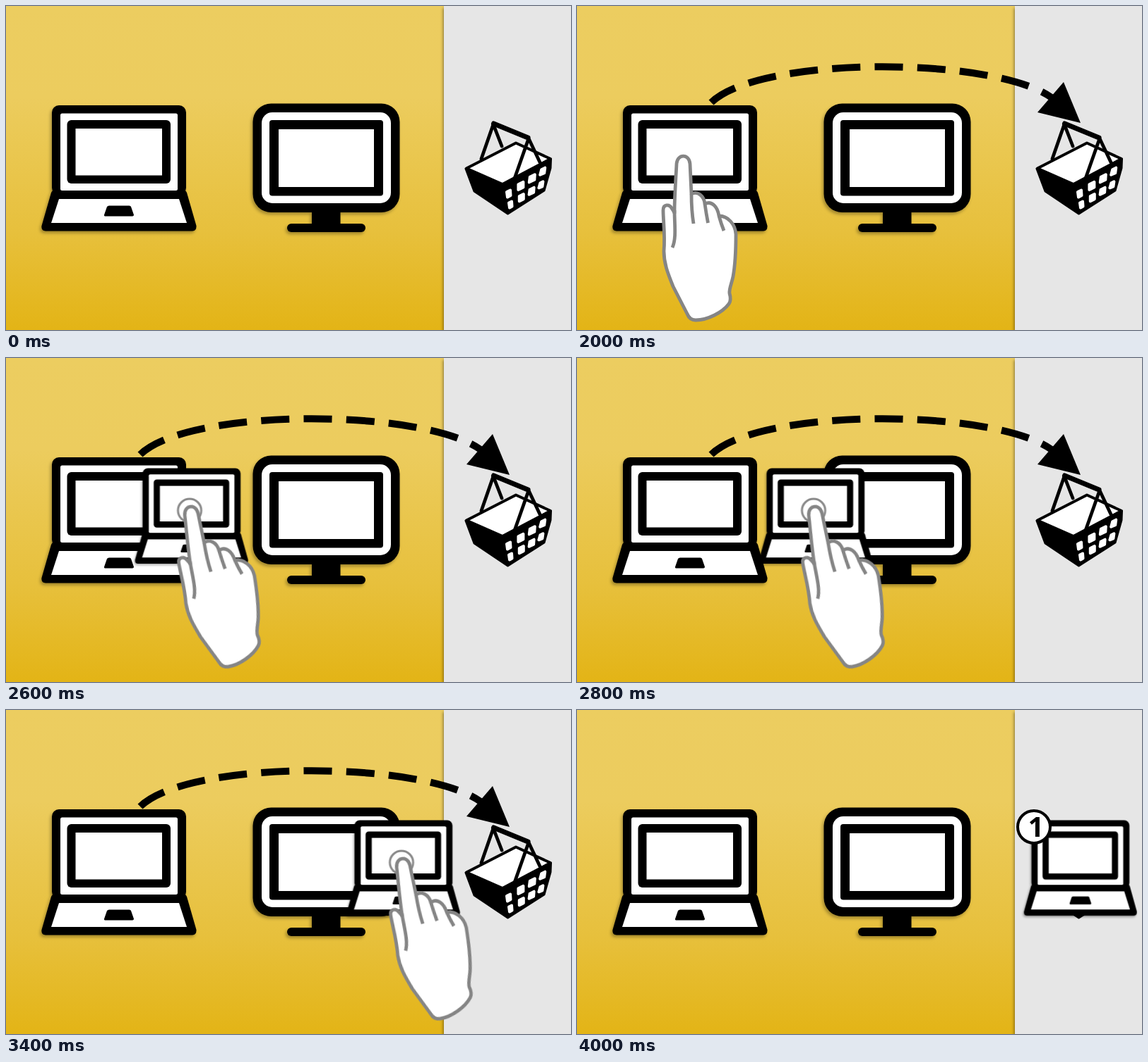
These frames come from a looping animation (800 px wide and 460 px high, 6000 ms). An HTML page:

```html
<!DOCTYPE html>
<html lang="en">
<head>
<meta charset="utf-8">
<title>Drag to basket</title>
<style>
html, body { margin: 0; width: 100%; height: 100%; overflow: hidden; }
body { position: relative; background: linear-gradient(#eccd60 0, #eccc5e 28%, #e7c03c 70%, #e3b416 100%); }
.panel { position: absolute; left: 620px; top: 0; right: 0; bottom: 0; background: #e6e6e6; box-shadow: -1px 3px 4px rgba(0, 0, 0, .45); }
svg { position: absolute; left: 0; top: 0; display: block; }
.device { filter: drop-shadow(-2px 3px 2px rgba(0, 0, 0, .3)); }
.w { fill: #fff; }
.line { fill: none; stroke: #000; stroke-linecap: round; stroke-linejoin: round; }
.skin { fill: #fff; stroke: #858585; stroke-width: 4.8; stroke-linejoin: round; stroke-linecap: round; }
.skin .crease { fill: none; stroke-linecap: butt; }
.ring { fill: #fff; stroke: #8a8a8a; stroke-width: 3; }
.badge text { font: 700 39px "Open Sans", "Noto Sans", sans-serif; text-anchor: middle; }

/* Percentages sit a hair early so each step is in place on its tick. */
.arrow, .copy, .hand, .ring, .badge, .pose, .drag { animation: 6s step-end infinite; }
.arrow { animation-name: arrow; }
.copy { animation-name: copy; }
.hand { animation-name: hand; }
.ring { animation-name: ring; }
.badge { animation-name: badge; }
.pose { animation-name: pose; transform-origin: 150px 213px; }
.drag { animation-name: drag; }
@keyframes arrow { 0% { visibility: hidden } 16.66% { visibility: visible } 66.66%, 100% { visibility: hidden } }
@keyframes hand { 0% { visibility: hidden } 33.33% { visibility: visible } 66.66%, 100% { visibility: hidden } }
@keyframes ring { 0% { visibility: hidden } 36.66% { visibility: visible } 64.99%, 100% { visibility: hidden } }
@keyframes copy { 0% { visibility: hidden } 38.33%, 100% { visibility: visible } }
@keyframes badge { 0% { visibility: hidden } 66.66%, 100% { visibility: visible } }
@keyframes pose {
  0% { transform: none }
  34.99% { transform: translate(-1px, -1px) rotate(-4.5deg) }
  36.66%, 100% { transform: translate(-2.2px, -2px) rotate(-9deg) }
}
@keyframes drag {
  0% { transform: translateX(0) }
  38.33% { transform: translateX(0); animation-timing-function: steps(15, end) }
  63.33%, 100% { transform: translateX(562.5px) }
}
</style>
</head>
<body>
<div class="panel"></div>
<svg width="800" height="460" viewBox="0 0 800 460">
  <defs>
    <g id="laptop">
      <rect x="65" y="141" width="190" height="127" rx="10"/>
      <path d="M67 262H253Q255 262 256 265L269.500 312Q270 319.500 264 319.500H56Q49.500 319.500 50.500 312L64 265Q65 262 67 262Z"/>
      <rect class="w" x="77" y="152.500" width="166" height="109.500" rx="2.500"/>
      <rect x="86.500" y="162" width="146.500" height="90" rx="6"/>
      <rect class="w" x="98.500" y="174" width="122.500" height="66.500"/>
      <path class="w" d="M75 274H245L256 308H64Z"/>
      <path d="M146 283.500H174.500Q176.500 283.500 177 285L181 296.500Q181 298.500 179 298.500H141Q138.500 298.500 139 296.500L143 285Q144 283.500 146 283.500Z"/>
    </g>
  </defs>

  <use class="device" href="#laptop"/>

  <g class="device">
    <rect x="349.500" y="138.500" width="208" height="154.500" rx="26"/>
    <rect x="433" y="290" width="40.500" height="22"/>
    <rect x="398" y="309" width="111" height="12" rx="6"/>
    <rect class="w" x="362" y="151" width="183" height="129" rx="15"/>
    <rect x="373" y="162" width="161" height="107.500" rx="4"/>
    <rect class="w" x="386" y="175" width="135" height="82"/>
  </g>

  <g id="basket">
    <path class="line" style="fill:#fff" stroke-width="4" d="M652 230.500L722 194.500L771 217L703 253Z"/>
    <path class="line" style="fill:#000" stroke-width="3" d="M651 231L703 254.500L771.500 217.500L771 230L762 262L710.500 295L663 263Z"/>
    <path class="line" stroke-width="4.800" d="M673 217L690 168L702 199M756 222L740 188L720 245"/>
    <path class="line" stroke-width="7" d="M690.500 167L739 187"/>
  </g>

  <g class="arrow">
    <path d="M190 137C260 69.500 590 71.500 672 130" fill="none" stroke="#000" stroke-width="10" stroke-dasharray="40 20.200"/>
    <path d="M689 108L713 166L652 151Z"/>
  </g>

  <g class="drag">
    <g class="copy">
      <use class="device" href="#laptop" transform="translate(33.500 49.500) scale(.73 .759)"/>
    </g>
    <circle class="ring" cx="147.500" cy="216.500" r="16.500"/>
    <g class="hand">
      <g class="pose skin">
        <path d="M138 294C138 270 140 245 141 224C142 209.500 159 209.500 160 224L162 267C171 262 180 270 181 281C191 276 199 285 201 298C214 298 224 310 225 324C225 350 223.500 370 221 384C219 394 215 402 216 408C218 415 218 419 215 423C206 435 185 446 168 446C162 446 158 442 156 437L136 398C128 378 123 365 123 348C125 325 122 305 122 290C122 281 131 281 134 287Q137 291 138 294Z"/>
        <path class="crease" d="M138 290C138 310 141 330 135 343M162 267Q162 290 165 309M181 281Q183 295 185.500 308M201 298Q204 309 208 319"/>
      </g>
    </g>
  </g>

  <g class="badge">
    <circle cx="647" cy="166" r="23" fill="#fff" stroke="#000" stroke-width="4"/>
    <text x="650" y="180">1</text>
  </g>
</svg>
<script>
// Openings in the basket's right side: two slanted rows of four, rounded by the stroke.
const rows = [
  { x: 709, y: 264, dx: 16.4, dy: -10.6, w: 7, h: 7.5 },
  { x: 712, y: 279.5, dx: 14.8, dy: -9.4, w: 6, h: 7 }
];
let d = "";
for (const { x, y, dx, dy, w, h } of rows) {
  for (let i = 0; i < 4; i++) {
    const lean = 1 - i;
    const side = i % 3 ? w : w - 2;
    d += `M${x + dx * i} ${y + dy * i}l${side} ${-side * .5}l${lean * .5} ${h}l${-side + lean * .5} ${side * .5}z`;
  }
}
const holes = document.createElementNS("http://www.w3.org/2000/svg", "path");
for (const [k, v] of Object.entries({ d, fill: "#fff", stroke: "#fff", "stroke-width": 4, "stroke-linejoin": "round" })) {
  holes.setAttribute(k, v);
}
document.getElementById("basket").append(holes);
</script>
</body>
</html>
```
